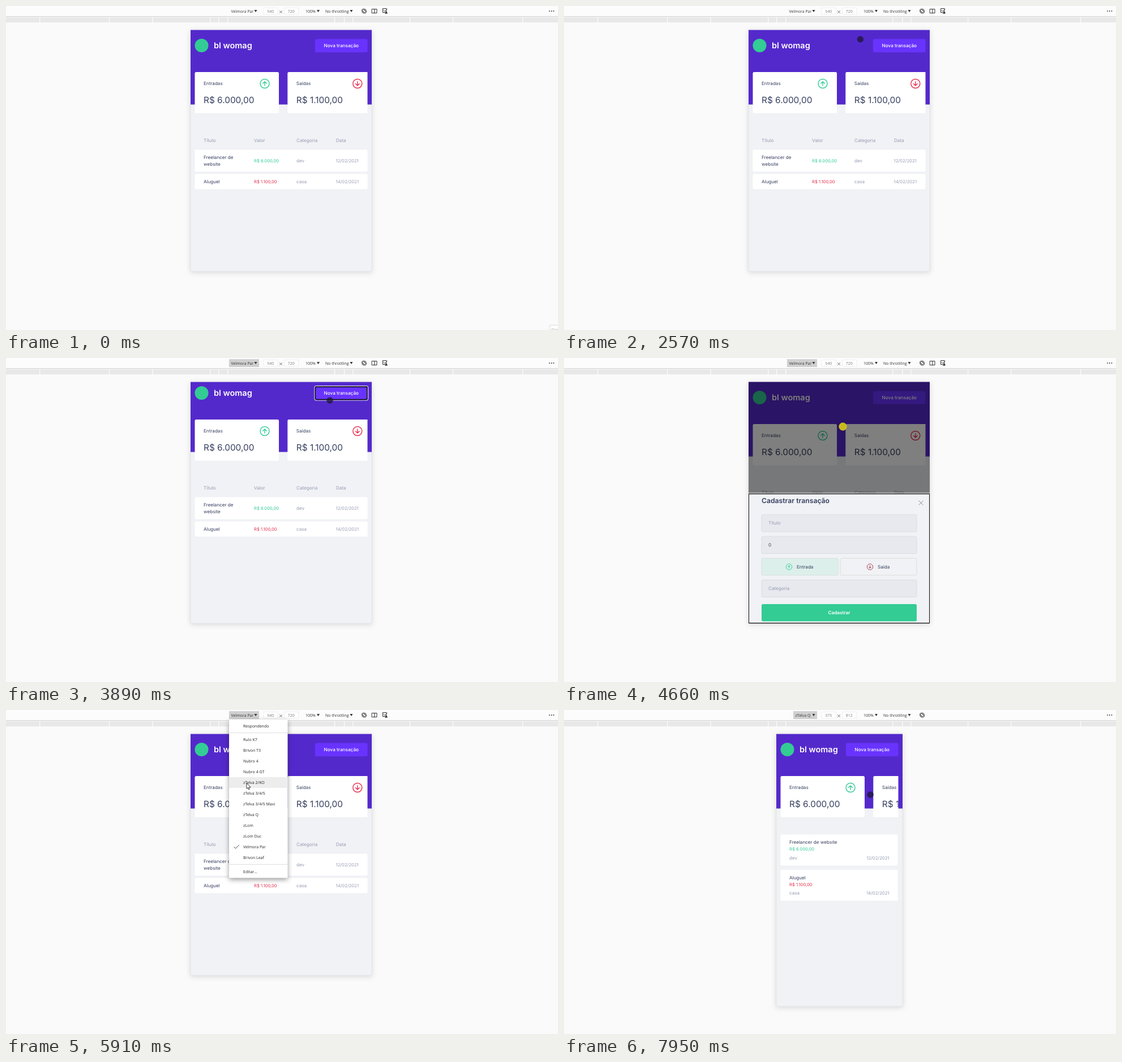
An HTML page for the animation above (8 s loop, 975 by 574 pixels).

```html
<!DOCTYPE html>
<html lang="pt-BR">
<head>
<meta charset="utf-8">
<title>Controle de transações</title>
<style>
  html, body { margin: 0; width: 100%; height: 100%; overflow: hidden; background: #fafafa; }
  svg { display: block; width: 100vw; height: 100vh; }
  text { font: 8px Inter, sans-serif; white-space: pre; text-rendering: geometricPrecision; }
  .ui text { font-family: "Open Sans", "Noto Sans", sans-serif; }
  .shadow { filter: drop-shadow(0 2px 5px #0002); }
  .menu-shadow { filter: drop-shadow(0 3px 4px #0006); }
</style>
</head>
<body>
<svg id="stage" viewBox="0 0 975 574"></svg>
<script>
const LOOP = 8000;
const GREEN = '#33cc95', RED = '#e52e4d', INK = '#363f5f', MUTED = '#969cb3', PAPER = '#f0f2f5';
const stage = document.getElementById('stage');

const WIDE = { name: 'Velmora Par', size: [540, 720], x: 326, w: 320, bottom: 470, button: 394 };
const NARROW = { name: 'zTelva Q', size: [375, 812], x: 375, w: 223, bottom: 525, button: 405 };
const DEVICES = ['Rulo K7', 'Brivon T3', 'Nubro 4', 'Nubro 4 GT', 'zTelva 2/KO', 'zTelva 3/4/5',
  'zTelva 3/4/5 Maxi', 'zTelva Q', 'zLom', 'zLom Duc', 'Velmora Par', 'Brivon Leaf'];
const MENU = [['Respondendo', 28], ...DEVICES.map((name, i) => [name, 52.5 + 19 * i]), ['Editar...', 286]];

const SWITCH_AT = 7200, MODAL_OPEN = 4100, MODAL_CLOSE = 4760;

// Pointer path: time, x, y
const PATH = [
  [340, 957, 545], [1000, 374, 30], [1130, 392, 16], [1390, 407, 9], [1950, 407, 9],
  [2250, 582, 80], [2450, 578, 84], [2750, 425, 14], [2850, 412, 12], [3150, 420, 34],
  [3270, 421, 37.9], [3560, 582, 80], [3740, 576, 26], [3890, 572, 75], [4100, 580, 70],
  [4380, 540, 110], [4600, 492.5, 121.5], [4760, 492.5, 121.5], [4950, 742, 80], [5220, 633, 5],
  [5450, 412, 10], [5550, 412, 10], [5910, 425, 130], [6060, 432, 186], [6400, 440, 224],
  [6880, 430, 186], [7080, 430, 186], [7500, 500, 140], [7850, 552, 90], [7950, 541, 150], [8000, 541, 150]
];

const clamp = v => Math.max(0, Math.min(1, v));
const ramp = (t, from, to) => clamp((t - from) / (to - from));
const smooth = p => p * p * (3 - 2 * p);

function pointerAt(t) {
  const i = PATH.findIndex(p => p[0] > t);
  const [t0, x0, y0] = PATH[i - 1], [t1, x1, y1] = PATH[i];
  const p = smooth(ramp(t, t0, t1));
  return [x0 + (x1 - x0) * p, y0 + (y1 - y0) * p];
}

const rect = (x, y, w, h, fill, extra = '') =>
  `<rect x="${x}" y="${y}" width="${w}" height="${h}" fill="${fill}" ${extra}/>`;
const box = (x, y, w, h, fill, extra = '') => rect(x, y, w, h, fill, 'rx="2.5" ' + extra);
const text = (x, y, str, fill, size = 8.1, weight = 400, anchor = 'start') =>
  `<text x="${x}" y="${y}" fill="${fill}" text-anchor="${anchor}" style="font-size:${size}px;font-weight:${weight}">${str}</text>`;
const line = (d, stroke, width = 1, fill = 'none') =>
  `<path d="${d}" stroke="${stroke}" stroke-width="${width}" fill="${fill}" stroke-linecap="round" stroke-linejoin="round"/>`;
const circle = (x, y, r, fill, extra = '') => `<circle cx="${x}" cy="${y}" r="${r}" fill="${fill}" ${extra}/>`;
const group = (content, attrs) => `<g ${attrs}>${content}</g>`;

function arrowIcon(x, y, color, up, scale = 1) {
  const turn = up ? '' : 'rotate(180)';
  return group(circle(0, 0, 8, 'none', `stroke="${color}" stroke-width="1.4"`) +
    line('M0 3.6V-3.6M-3.3 -.3L0 -3.6L3.3 -.3', color, 1.4),
    `transform="translate(${x} ${y}) scale(${scale}) ${turn}"`);
}

function toolbar(device, active) {
  const caret = x => `<path d="M${x} 7h5l-2.5 4z" fill="#333"/>`;
  const b = device.button;
  let s = rect(0, 0, 975, 18, '#fcfcfc') + rect(0, 18, 975, 1, '#cfcfcf') + rect(0, 20, 975, 9, '#e8e8e8');
  for (const x of [59, 182, 258, 360, 375, 391, 580, 597, 612, 713, 789, 912]) s += rect(x, 20, 1.3, 9, '#fafafa');
  if (active) s += rect(b, 2, 447 - b, 14, '#d0d0d0');
  s += text(b + 3.5, 11.8, device.name, '#333', 7) + caret(438.5);
  device.size.forEach((n, i) => {
    const x = 455 + 36.5 * i;
    s += rect(x, 3.5, 25, 11, '#fff', 'stroke="#eee"') + text(x + 12.3, 11.8, n, '#777', 7, 400, 'middle');
  });
  s += line('M483.5 8.5l4 4m0-4l-4 4', '#444', .8);
  s += text(529, 11.8, '100%', '#333', 7) + caret(549) + text(564, 11.8, 'No throttling', '#333', 7) + caret(607.5);
  s += circle(632.5, 9, 3.8, 'none', 'stroke="#333"') +
    rect(-1.7, -4, 3.4, 8, '#fff', 'rx=".8" stroke="#333" transform="translate(632.5 9) rotate(-45)"');
  if (device === WIDE) {
    s += line('M646.5 5.5h8.5v7h-8.5zM650.7 5.5v7', '#333');
    s += line('M672 7.5V4.5h-6.5v7H669M667 7.5l2 2l4-4', '#333') + line('M671 9v1.5l-1.5 2.5h4l-1.5-2.5V9', '#333', 1, '#333');
  }
  for (const x of [960, 963.7, 967.4]) s += circle(x, 9, .9, '#333');
  return group(s, 'class="ui"');
}

function table() {
  let s = '';
  [['Título', 349], ['Valor', 438], ['Categoria', 513], ['Data', 583]].forEach(([str, x]) => s += text(x, 240.6, str, MUTED));
  const row = (y, h, value, color, category, date) => {
    const base = y + h / 2 + 2.6;
    return box(333.5, y, 305, h, '#fff') + text(438, base, value, color, 7.6) +
      text(513, base, category, MUTED) + text(582.5, base, date, MUTED, 7.7);
  };
  return s + row(254.5, 39, 'R$ 6.000,00', GREEN, 'dev', '12/02/2021') +
    text(349, 271, 'Freelancer de', INK) + text(349, 283, 'website', INK) +
    row(297.5, 27, 'R$ 1.100,00', RED, 'casa', '14/02/2021') + text(349, 313.6, 'Aluguel', INK);
}

function cardList() {
  const card = (y, title, value, color, category, date) =>
    box(333.5, y, 207, 55, '#fff') + text(349, y + 16.5, title, INK) + text(349, y + 28.5, value, color, 7.6) +
    text(349, y + 44, category, MUTED) + text(525.5, y + 44, date, MUTED, 7.7, 400, 'end');
  return card(220.5, 'Freelancer de website', 'R$ 6.000,00', GREEN, 'dev', '12/02/2021') +
    card(283, 'Aluguel', 'R$ 1.100,00', RED, 'casa', '14/02/2021');
}

function summary(x, title, value, color, up) {
  return box(x, 117, 148.5, 73, '#fff') + text(x + 15.5, 140.4, title, INK) +
    arrowIcon(x + 123.5, 137.5, color, up) + text(x + 15.5, 172, value, INK, 15.4);
}

function page(device, scroll, focused) {
  const right = 326 + device.w - 7.5, bx = right - 92.5;
  let s = rect(326, 0, device.w, 174.5, '#5429cc') + circle(345.5, 70, 12, GREEN) +
    text(367, 75, 'bl womag', '#fff', 14.5, 600) +
    box(bx, 58.5, 92.5, 23.5, '#6933ff') + text(bx + 46.3, 72.8, 'Nova transação', '#fff', 8.2, 500, 'middle');
  if (focused) {
    s += box(bx - 1, 57.5, 94.5, 25.5, 'none', 'stroke="#fff"') + box(bx + .4, 58.9, 91.7, 22.7, 'none', 'stroke="#101010" stroke-width="1.6"');
  }
  s += group(summary(333.5, 'Entradas', 'R$ 6.000,00', GREEN, true) +
    summary(497.3, 'Saídas', 'R$ 1.100,00', RED, false), 'clip-path="url(#cards)"');
  s += device === WIDE ? table() : cardList();
  const h = device.bottom - 42.5;
  return `<clipPath id="screen">${rect(device.x, 42.5, device.w, h)}</clipPath>` +
    `<clipPath id="cards">${rect(326, 100, right - 326, 100)}</clipPath>` +
    rect(device.x, 42.5, device.w, h, PAPER, 'class="shadow" stroke="#e2e3e6" stroke-width=".8"') +
    group(group(s, `transform="translate(${device.x - 326} ${-scroll})"`), 'clip-path="url(#screen)"');
}

function modal() {
  const field = (y, str, color) => box(349, y, 274, 30.3, '#e7e9ee', 'stroke="#d7d9dd" stroke-width=".8"') +
    text(361, y + 17.8, str, color);
  return rect(326, 42.5, 320, 428, '#000', 'opacity=".5"') + rect(326, 238.6, 320, 1, '#ddd') +
    rect(326.5, 240.9, 319, 228.6, PAPER, 'stroke="#111"') +
    text(349, 257.2, 'Cadastrar transação', INK, 12.2, 600) +
    line('M627 253l7.2 7.2m0-7.2l-7.2 7.2', '#888', 1) +
    field(277.6, 'Título', MUTED) + field(316.2, '0', INK) +
    box(349, 354.8, 135, 30, '#ddefeb', 'stroke="#d2dcdc" stroke-width=".8"') +
    box(488, 354.8, 135, 30, 'none', 'stroke="#d7d7d7" stroke-width=".8"') +
    arrowIcon(397.5, 370, GREEN, true, .65) + text(411, 372.6, 'Entrada', INK) +
    arrowIcon(540.5, 370, '#a8324c', false, .65) + text(554, 372.6, 'Saída', INK) +
    field(393.2, 'Categoria', MUTED) +
    box(349, 436, 274, 30.5, GREEN) + text(486, 453.7, 'Cadastrar', '#fff', 8.2, 600, 'middle');
}

function menu(alpha, y) {
  const hovered = MENU.find(([, center]) => Math.abs(y - center) <= 10 && y > 18);
  let s = rect(394, 17, 103.5, 280.5, '#fff', 'rx="1.5" class="menu-shadow"');
  if (hovered) s += rect(394, hovered[1] - 9.5, 103.5, 19, '#ededed');
  s += rect(394, 40, 103.5, .8, '#d8d8d8') + rect(394, 273, 103.5, .8, '#d8d8d8');
  for (const [str, center] of MENU) s += text(419, center + 2.6, str, '#222', 7);
  s += line('M402.8 242.5l2.8 2.8l5.8-6', '#333', .9);
  return group(s, `class="ui" opacity="${alpha}"`);
}

function cursor(kind, x, y) {
  if (kind === 'press') return circle(x, y, 6.6, '#c9b91c', 'stroke="#ddcf25"');
  if (kind === 'touch') return circle(x, y, 5.8, '#1c1530', 'opacity=".72"');
  const shape = kind === 'hand'
    ? 'M-1 9V.8a1 1 0 0 1 2 0V5l4.5 1q1 .3 1 1.5V10l-1.5 3.5h-5L-3.5 9q.3-1.6 2.5 0Z'
    : 'M0 0V9.5L2.2 7.5L3.7 11L5.2 10.3L3.7 7H6.8Z';
  return group(line(shape, '#111', .8, '#fff'), `transform="translate(${x} ${y})"`);
}

function scene(t) {
  const device = t < SWITCH_AT ? WIDE : NARROW;
  const modalOpen = t >= MODAL_OPEN && t < MODAL_CLOSE;
  const focused = (t >= 3800 && t < MODAL_OPEN) || (t >= MODAL_CLOSE && t < 5520);
  const scroll = t < MODAL_OPEN ? 8 * smooth(ramp(t, 3620, 3760)) : 0;
  const menuAlpha = t < 5000
    ? (t >= 2880 ? 1 - ramp(t, 3220, 3387) : 0)
    : ramp(t, 5500, 5600) * (1 - ramp(t, 7130, 7270));
  const [x, y] = t < 340 ? [0, 0] : pointerAt(t);
  const inside = (l, top, r, b) => x >= l && x <= r && y >= top && y <= b;
  const overButton = t >= 340 && inside(device.button, 2, 447, 16);
  const overMenu = menuAlpha > 0 && inside(394, 17, 497, 297);

  let s = rect(0, 0, 975, 574, '#fafafa') + page(device, scroll, focused) + toolbar(device, overButton || t >= 2880);
  if (modalOpen) s += modal();
  if (menuAlpha > 0) s += menu(menuAlpha, overMenu ? y : 0);
  if (t < 30) s += rect(960.5, 565.5, 20, 12, '#fff', 'stroke="#ddd"') + text(963, 576, 'Gra', '#aaa', 7);
  if (t >= 340) {
    const overPage = !overMenu && inside(device.x, 42.5, device.x + device.w, device.bottom);
    const pressed = t >= 4640 && t < MODAL_CLOSE;
    s += cursor(pressed ? 'press' : overPage ? 'touch' : overButton ? 'hand' : 'arrow', x, y);
  }
  return s;
}

let shown = '';
function frame() {
  const next = scene(performance.now() % LOOP);
  if (next !== shown) stage.innerHTML = shown = next;
  requestAnimationFrame(frame);
}
frame();
</script>
</body>
</html>
```
